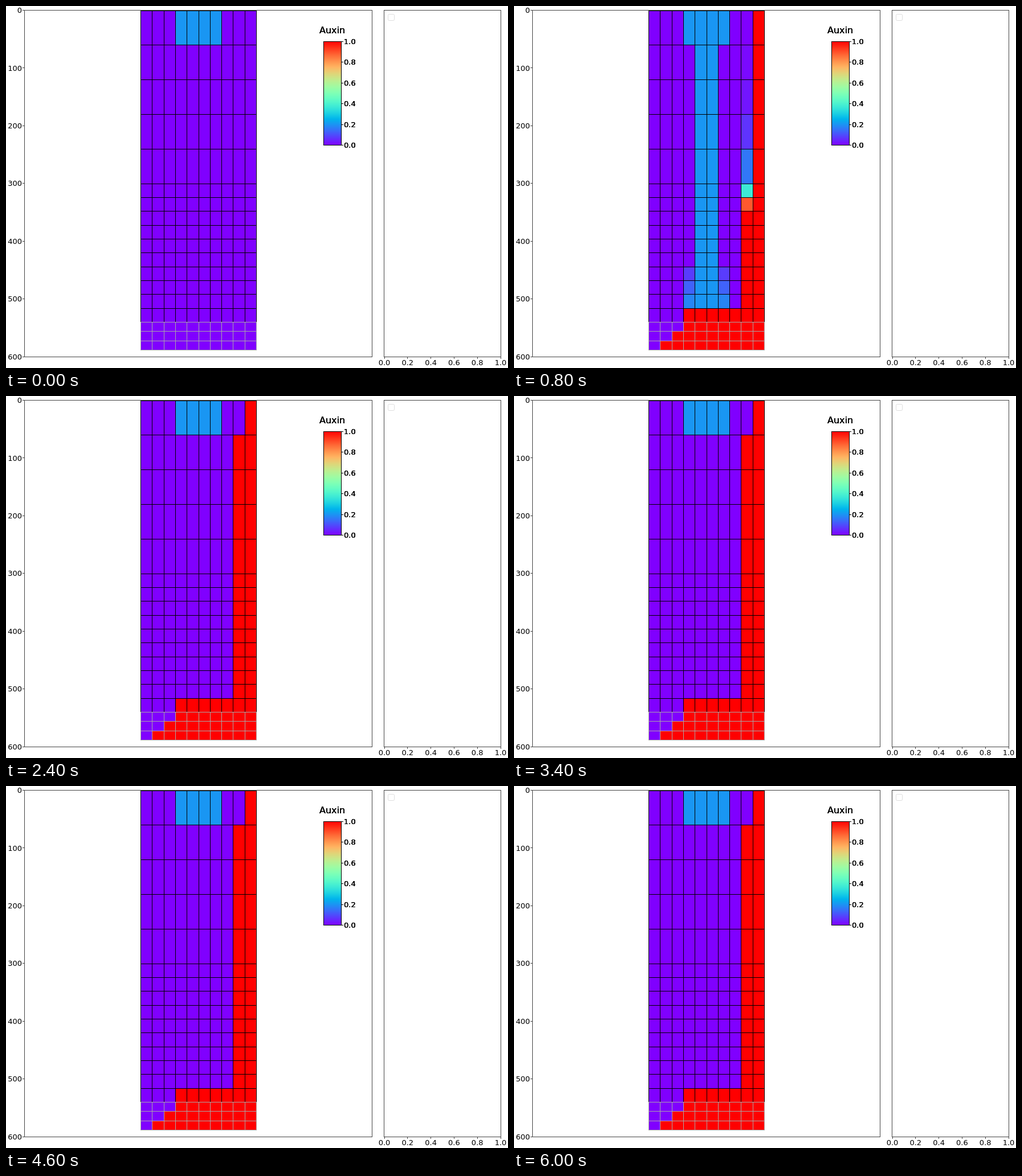
These frames come from a looping animation (881x636 px, 6.2 s). An HTML page with a canvas:

```html
<!DOCTYPE html>
<html>
<head>
<meta charset="utf-8">
<style>
html, body { margin: 0; width: 100%; height: 100%; overflow: hidden; background: #fff; }
canvas { display: block; }
</style>
</head>
<body>
<canvas id="stage" width="881" height="636"></canvas>
<script>
const ctx = document.getElementById("stage").getContext("2d");
const LOOP = 6200, STEP = 200, LAST = 7;
const SCALE = 1.0142;
const px = u => Math.floor(236.35 + u * 1.0165);
const py = u => Math.floor(8 + u * SCALE);

// Row edges: tall cells, short cells, then the cap
const rows = [0];
for (const [count, height] of [[5, 60], [10, 24], [3, 16]])
  for (let i = 0; i < count; i++) rows.push(rows[rows.length - 1] + height);

// State of each part per step
const stele = [0, 0.2, 0.2, 0.2, 0.2, 0.1, 0.03, 0];
const steleEnd = [0, 9, 13, 13, 13, 13, 13, 13];
const side = [0, 0, 0.2, 0.6, 1, 0.4, 0, 0];
const tip = [0, 0.15, 0.7, 1, 1, 1, 1, 1];
const outerFront = [99, 99, 12, 4, -9, -9, -9, -9];
const innerFront = [99, 99, 14, 9.5, 5, 2.5, 0.5, -5];
const capStart = [3, 3, 2, 1];

const front = (r, f) => Math.min(1, 0.37 * Math.pow(2.4, r - f));

function auxin(r, c, k) {
  if (r >= 14) return c >= capStart[r - 14] ? tip[k] : 0;
  if (c === 9) return front(r, outerFront[k]);
  if (r === 0) return c >= 3 && c <= 6 ? 0.2 : 0;
  if (c === 8) return front(r, innerFront[k]);
  if (c === 4 || c === 5) return r <= steleEnd[k] ? stele[k] : 0;
  if ((c === 3 || c === 6) && r >= 11) return side[k] * (0.075 + 0.05 * (r - 11));
  return 0;
}

function rainbow(v) {
  const rgb = [Math.abs(2 * v - 0.5), Math.sin(Math.PI * v), Math.cos(Math.PI * v / 2)];
  return `rgb(${rgb.map(x => Math.round(255 * Math.min(1, Math.max(0, x)))).join(",")})`;
}

function rect(x, y, w, h, color) {
  ctx.fillStyle = color;
  ctx.fillRect(x, y, w, h);
}

function frame(x, y, w, h, color) {
  ctx.strokeStyle = color;
  ctx.lineWidth = 1;
  ctx.strokeRect(x + 0.5, y + 0.5, w, h);
}

function label(text, x, y, size, align, passes = 1) {
  ctx.font = `${size}px "DejaVu Sans", sans-serif`;
  ctx.textAlign = align;
  ctx.fillStyle = "#000";
  for (let i = 0; i < passes; i++) ctx.fillText(text, x, y);
}

function drawAxes() {
  const line = "#444";
  frame(32, 7, 610, 609, line);
  frame(663, 7, 205, 609, line);
  for (let v = 0; v <= 600; v += 100) {
    const y = 7.5 + v * SCALE;
    rect(29, Math.floor(y), 3, 1, line);
    label(v, 28, y + 4.7, 13, "right");
  }
  for (let i = 0; i <= 5; i++) {
    const x = 664 + i * 40.8;
    rect(Math.floor(x), 617, 1, 3, line);
    label((i / 5).toFixed(1), x, 631, 13, "center");
  }
  ctx.strokeStyle = "#ddd";
  ctx.beginPath();
  ctx.roundRect(670.5, 14.5, 11, 11, 2);
  ctx.stroke();
}

function drawBar() {
  label("Auxin", 572.5, 48, 16, "center", 3);
  for (let y = 62; y < 244; y++) rect(558, y, 30, 1, rainbow((243.5 - y) / 182));
  frame(557, 62, 31, 182, "#000");
  for (let i = 0; i <= 5; i++) {
    const y = 244 - i * 36.4;
    rect(589, Math.round(y), 3, 1, "#000");
    label((i / 5).toFixed(1), 593, y + 5, 13, "left", 3);
  }
}

function drawCells(k) {
  for (let r = 0; r < 18; r++) {
    const y = py(rows[r]), h = py(rows[r + 1]) - y;
    for (let c = 0; c < 10; c++) {
      const x = px(c * 20), w = px(c * 20 + 20) - x;
      rect(x, y, w, h, rainbow(auxin(r, c, k)));
      frame(x, y, w, h, r < 15 ? "#000" : "#a8a8a8");
    }
  }
}

function draw(now) {
  const k = Math.min(LAST, Math.floor((now % LOOP) / STEP));
  rect(0, 0, 881, 636, "#fff");
  drawCells(k);
  drawAxes();
  drawBar();
  requestAnimationFrame(draw);
}
draw(0);
</script>
</body>
</html>
```
